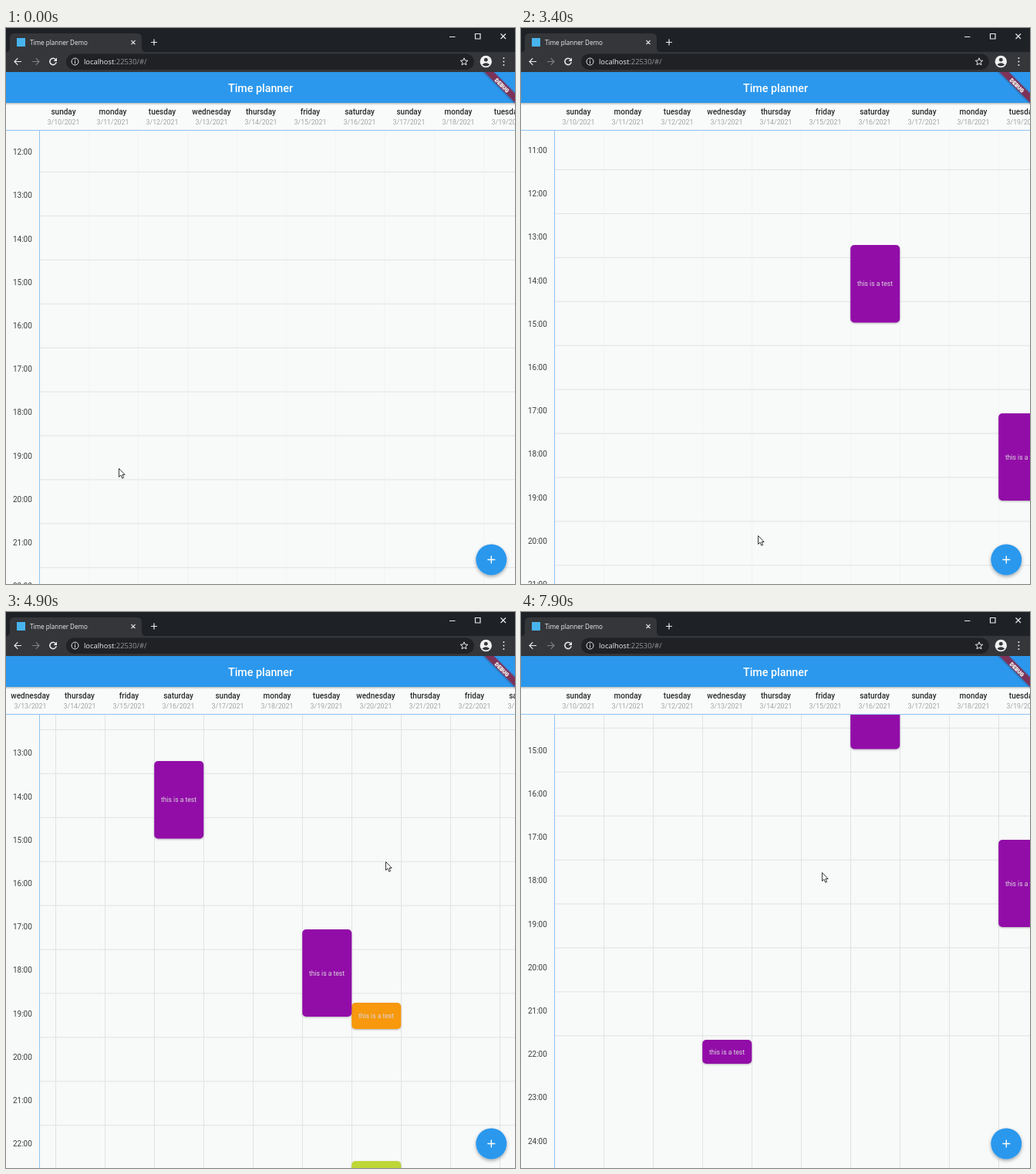
Recreate the animation shown at these times as an HTML page. Size 660x720 px, loop 8000 ms.

```html
<!DOCTYPE html>
<html lang="en">
<head>
<meta charset="utf-8">
<title>Time planner Demo</title>
<style>
html, body { margin: 0; width: 100%; height: 100%; overflow: hidden; background: #f8f9f9; }
svg { display: block; width: 660px; height: 720px; font-family: Roboto, sans-serif; }
.mid { text-anchor: middle; }
.day { font-size: 10px; font-weight: 500; fill: #2b2b2b; }
.date { font-size: 8.8px; fill: #a3a4a4; }
.hour { font-size: 10px; fill: #3c3c3c; }
.note { font-size: 8.57px; fill: #d9d6da; }
.ui { font-family: "Open Sans", sans-serif; fill: #f1f1f2; }
.icon { fill: none; stroke: #e8eaed; stroke-width: 1.2; }
.rule { stroke: #e1e2e3; stroke-width: 1; }
</style>
</head>
<body>
<svg viewBox="0 0 660 720">
  <defs>
    <clipPath id="gridClip"><rect x="43.5" y="133" width="617" height="587"/></clipPath>
    <clipPath id="hourClip"><rect y="133" width="43" height="587"/></clipPath>
    <clipPath id="barClip"><rect y="57" width="660" height="663"/></clipPath>
    <filter id="soft" x="-30%" y="-30%" width="160%" height="160%">
      <feDropShadow dx="0" dy="1" stdDeviation="1" flood-opacity=".28"/>
    </filter>
    <filter id="lift" x="-30%" y="-30%" width="160%" height="170%">
      <feDropShadow dx="0" dy="2" stdDeviation="2" flood-opacity=".33"/>
    </filter>
    <linearGradient id="fade" x2="0" y2="1">
      <stop stop-color="#000" stop-opacity=".24"/><stop offset="1" stop-color="#000" stop-opacity="0"/>
    </linearGradient>
  </defs>

  <rect width="660" height="720" fill="#f8f9f9"/>
  <g clip-path="url(#gridClip)">
    <g id="rows"></g>
    <g id="cols"></g>
    <g id="tasks"></g>
  </g>
  <g clip-path="url(#hourClip)"><g id="hours"></g></g>
  <rect y="97" width="660" height="36" fill="#f9fafa"/>
  <g id="days"></g>
  <path d="M0 132.5H660M43.5 133V720" stroke="#90c3f3"/>

  <rect y="97" width="660" height="3" fill="url(#fade)"/>
  <rect y="57" width="660" height="40" fill="#2c98ed"/>
  <text class="mid" x="330" y="82.6" font-size="14.3" font-weight="500" fill="#fff">Time planner</text>
  <g clip-path="url(#barClip)">
    <g transform="translate(643.5 74) rotate(45)" filter="url(#soft)">
      <rect x="-40" y="-4.4" width="80" height="8.8" fill="#7d3358"/>
      <text class="mid" y="2.6" font-size="7.2" font-weight="900" fill="#fff">DEBUG</text>
    </g>
  </g>

  <rect width="660" height="31" fill="#1e2125"/>
  <path d="M0 31Q5 31 5 26V13Q5 7 11 7H170Q176 7 176 13V26Q176 31 181 31Z" fill="#35363a"/>
  <rect y="31" width="660" height="26" fill="#35363a"/>
  <rect x="14" y="13" width="11" height="11" fill="#47b4ee"/>
  <text class="ui" x="31" y="21.8" font-size="8.1">Time planner Demo</text>
  <path class="icon" d="M162.5 16.2l5 5m0-5l-5 5M188 18.5h8m-4-4v8"/>
  <path class="icon" stroke-width="1" d="M575 11.5h7.5M608.5 7.5h6.5v6.5h-6.5zM641.5 7.5l6.5 6.5m0-6.5l-6.5 6.5"/>
  <path class="icon" stroke-width="1.5" d="M20 43.5H11m4.3-4.3L11 43.5l4.3 4.3"/>
  <path class="icon" style="stroke:#7d7f83" d="M34 43.5h9m-4.3-4.3l4.3 4.3-4.3 4.3"/>
  <path class="icon" style="stroke-width:1.5" d="M64.2 40.6A4.2 4.2 0 1 0 65.2 44.2"/>
  <path d="M66 38.6v4.4h-4.4z" fill="#e8eaed"/>
  <rect x="78" y="33.5" width="529" height="20.5" rx="10.2" fill="#202125"/>
  <circle class="icon" cx="89.5" cy="43.5" r="4.5" style="stroke-width:1"/>
  <path class="icon" style="stroke-width:1" d="M89.5 40.7v1.2m0 .9v3.4"/>
  <text class="ui" x="101" y="46.8" font-size="9.4">localhost<tspan fill="#96999d">:22530/#/</tspan></text>
  <path id="star" class="icon" style="stroke-width:1"/>
  <circle cx="622.3" cy="43.5" r="7.7" fill="#f1f1f2"/>
  <circle cx="622.3" cy="41.2" r="2.4" fill="#35363a"/>
  <path d="M617.4 47.6q4.9-4.6 9.8 0q-4.9 3.8-9.8 0z" fill="#35363a"/>
  <path d="M645.4 39v0m0 4.5v0m0 4.5v0" stroke="#e8eaed" stroke-width="2" stroke-linecap="round"/>

  <g filter="url(#lift)"><circle cx="629.3" cy="688.5" r="20" fill="#2c98ed"/></g>
  <circle id="ripple" cx="629.3" cy="688.5" fill="#fff"/>
  <path d="M624.3 688.5h10m-5-5v10" stroke="#fff" stroke-width="1.4"/>

  <path id="arrow" d="M.5 .5V11.4L3 9.1L4.8 13.2L6.6 12.4L4.9 8.5H8.2Z" fill="#fff" stroke="#222" stroke-width=".9"/>
  <path id="hand" d="M2.2 9V1.6Q2.2.5 3.1.5T4.1 1.6V6Q5.8 5.2 6.2 6.5Q7.8 5.8 8.2 7.1Q10 6.6 10 8.4V11Q9.8 13.3 8.7 14V15.6H3.4V14L-.6 9.3Q-1.4 8.2-.4 7.7T2.2 9Z" fill="#fff" stroke="#222" stroke-width=".9"/>
</svg>
<script>
const LOOP = 8000, STEP = 100;
const COL = 64, LEFT = 43;
const PURPLE = "#920fa8";
const $ = id => document.getElementById(id);

// [ms, x, y]
const pointer = [
  [400, 146, 570], [1100, 428, 415], [1300, 428, 415], [1600, 635, 700], [2600, 635, 700],
  [3000, 310, 453], [3400, 307, 657], [3500, 307, 708], [3800, 452, 545], [4100, 352, 538],
  [4400, 218, 534], [4700, 480, 463], [4900, 492, 323], [5300, 503, 564], [5800, 635, 698],
  [6200, 635, 698], [6400, 430, 690], [6700, 335, 430], [6800, 331, 525], [7100, 547, 618],
  [7500, 314, 490], [7900, 390, 337]
];
// [ms, offset]
const scrollX = [[3800, 0], [4100, -100.5], [4400, -235], [4900, -235], [5300, -220.5], [6800, -220.5], [7100, 0]];
const scrollY = [[0, 0], [100, -100], [200, -150], [3000, -150], [3400, 54], [3500, 105.5], [4700, 105.5],
  [4900, -34], [5300, 207], [6400, 207], [6700, -150]];
const clicks = [1700, 2400, 5900];

const tasks = [
  { col: 6, y: 227, h: 100.5, fill: PURPLE, at: 1800 },
  { col: 10, y: 540, h: 34, fill: "#f7980b", at: 2400 },
  { col: 10, y: 745, h: 99, fill: "#bfd639", at: 2400 },
  { col: 9, y: 445, h: 113, fill: PURPLE, at: 2700 },
  { col: 3, y: 704, h: 31, fill: PURPLE, at: 6000 }
];
const week = ["sunday", "monday", "tuesday", "wednesday", "thursday", "friday", "saturday"];

const list = (n, f) => Array.from({ length: n }, (_, i) => f(i)).join("");
const move = (id, x, y) => $(id).setAttribute("transform", `translate(${x} ${y})`);
const show = (el, on) => { el.style.display = on ? "" : "none"; };

function sample(keys, t, k = 1) {
  if (t <= keys[0][0]) return keys[0][k];
  const i = keys.findIndex(p => p[0] > t);
  if (i < 0) return keys[keys.length - 1][k];
  const a = keys[i - 1], b = keys[i];
  return a[k] + (b[k] - a[k]) * (t - a[0]) / (b[0] - a[0]);
}

function build() {
  $("rows").innerHTML = list(23, i => {
    const y = 186.4 + 56.93 * (i - 13);
    return `<path class="rule" d="M43 ${y}H660"/>`;
  });
  $("cols").innerHTML = list(20, i => `<path class="rule" d="M${LEFT + COL * i + .5} 133V720"/>`);
  $("hours").innerHTML = list(25, h =>
    `<text class="hour mid" x="21.4" y="${164.1 + 56.2 * (h - 12)}">${h}:00</text>`);
  $("days").innerHTML = list(18, i => {
    const x = 74.5 + COL * i;
    return `<text class="day mid" x="${x}" y="112.4">${week[i % 7]}</text>` +
      `<text class="date mid" x="${x}" y="124.8">3/${10 + i}/2021</text>`;
  });
  $("tasks").innerHTML = tasks.map(({ col, y, h, fill }) => {
    const x = LEFT + COL * col;
    return `<g><rect x="${x + .2}" y="${y}" width="64" height="${h}" rx="5" fill="${fill}" filter="url(#soft)"/>` +
      `<text class="note mid" x="${x + 32}" y="${y + h / 2 + 3}">this is a test</text></g>`;
  }).join("");
  $("star").setAttribute("d", "M" + list(10, i => {
    const r = i % 2 ? 2.2 : 5, a = i * Math.PI / 5;
    return `${594 + r * Math.sin(a)} ${43.8 - r * Math.cos(a)} `;
  }) + "Z");
}

function draw(ms) {
  const t = Math.floor(ms % LOOP / STEP) * STEP;
  const x = sample(scrollX, t), y = sample(scrollY, t);
  move("rows", 0, y);
  move("hours", 0, y);
  move("cols", x, 0);
  move("days", x, 0);
  move("tasks", x, y);
  $("cols").setAttribute("opacity", t < 3600 ? .25 : 1);
  tasks.forEach((task, i) => show($("tasks").children[i], t >= task.at));

  const px = sample(pointer, t, 1), py = sample(pointer, t, 2);
  const over = Math.hypot(px - 629.3, py - 688.5) < 20;
  move("arrow", px, py);
  move("hand", px, py);
  show($("arrow"), !over);
  show($("hand"), over);

  const age = Math.min(...clicks.map(c => t < c ? Infinity : t - c));
  const on = age < 200;
  $("ripple").setAttribute("r", on ? 12 + age * .08 : 0);
  $("ripple").setAttribute("opacity", on ? .2 - age * .001 : 0);
}

build();
const start = performance.now();
function tick() {
  draw(performance.now() - start);
  requestAnimationFrame(tick);
}
tick();
</script>
</body>
</html>
```
